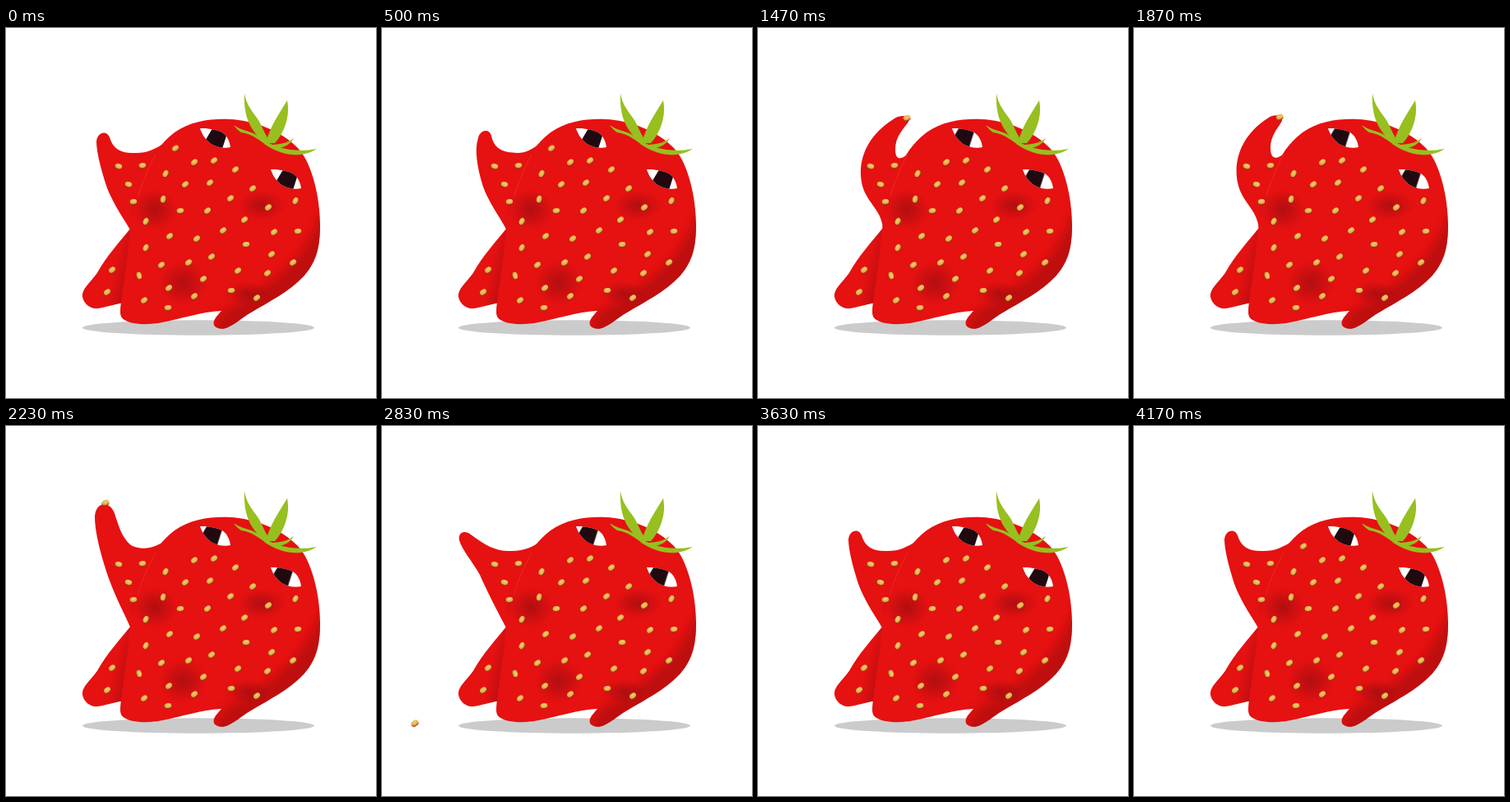
An HTML page that plays this animation: 450 px wide and 450 px high, repeating every 4210 ms.

```html
<!DOCTYPE html>
<html lang="en">
<head>
<meta charset="utf-8">
<title>Strawberry</title>
<style>
html, body { margin: 0; width: 100%; height: 100%; overflow: hidden; background: #fff; }
svg { display: block; width: 100%; height: 100%; }

#arm {
  --rest: path("M152 247C146 236 130 214 122 192C115 170 110 150 110 138C111 126 123 124 126 133C130 147 140 153 158 152C172 152 180 148 196 138L190 200Z");
  --raised: path("M152 247C152 222 133 214 127 192C120 165 130 132 166 110C176 104 186 108 183 114C176 124 167 132 167 148C167 164 178 162 196 138L190 200Z");
  --pick: path("M152 247C154 222 133 214 127 192C118 160 130 112 188 128C200 131 212 138 208 146C200 150 174 144 169 156C168 163 178 162 196 138L190 200Z");
  --aim: path("M152 247C146 232 134 210 126 188C116 160 108 130 108 110C109 92 126 90 132 106C137 122 141 136 152 145C166 152 180 149 196 138L190 200Z");
  --thrown: path("M152 247C144 232 130 206 119 181C110 165 97 150 94 139C92 129 101 126 108 132C125 145 138 152 154 152C172 153 184 147 196 138L190 200Z");
  d: var(--rest);
  animation: arm 4.21s linear infinite;
}
@keyframes arm {
  0%, 9.5% { d: var(--rest); animation-timing-function: ease-in; }
  17.8% { d: var(--raised); animation-timing-function: ease-out; }
  23%, 25.2% { d: var(--pick); animation-timing-function: ease-in-out; }
  33.7%, 42.8% { d: var(--raised); animation-timing-function: ease-in-out; }
  52%, 53% { d: var(--aim); }
  60.8%, 68.9% { d: var(--thrown); animation-timing-function: ease-in-out; }
  80.8%, 100% { d: var(--rest); }
}

#loose { animation: loose 4.21s linear infinite; }
@keyframes loose {
  0%, 25.2% { transform: translate(206px, 146px) rotate(-35deg); animation-timing-function: ease-in-out; }
  33.7%, 42.8% { transform: translate(181px, 109px) rotate(-20deg); animation-timing-function: ease-in-out; }
  52%, 53% { transform: translate(121px, 93px) rotate(-20deg); }
  57% { transform: translate(108px, 112px) rotate(-60deg); }
  59.3% { transform: translate(89px, 157px) rotate(-140deg); }
  61.6% { transform: translate(69px, 241px) rotate(-220deg); }
  63.9% { transform: translate(50px, 361px) rotate(-300deg); }
  67.2% { transform: translate(40px, 361px) rotate(-395deg); animation-timing-function: ease-out; }
  76% { transform: translate(27px, 361px) rotate(-470deg); opacity: 1; }
  77% { transform: translate(27px, 361px) rotate(-470deg); opacity: 0; animation-timing-function: step-end; }
  89% { transform: translate(206px, 146px) rotate(-35deg) scale(0); opacity: 1; animation-timing-function: ease-out; }
  94%, 100% { transform: translate(206px, 146px) rotate(-35deg) scale(1); opacity: 1; }
}

.pupil { fill: #200a10; animation: look 4.21s ease-in-out infinite; }
@keyframes look {
  0%, 26% { transform: none; }
  32%, 77% { transform: translate(-6.5px, -1px); }
  83%, 100% { transform: none; }
}
</style>
</head>
<body>
<svg viewBox="0 0 450 450">
  <defs>
    <radialGradient id="smudge">
      <stop offset="0" stop-color="#8c0c10" stop-opacity=".58"/>
      <stop offset=".5" stop-color="#960c10" stop-opacity=".34"/>
      <stop offset="1" stop-color="#a00c10" stop-opacity="0"/>
    </radialGradient>
    <radialGradient id="armFill" gradientUnits="userSpaceOnUse" cx="178" cy="220" r="28">
      <stop offset="0" stop-color="#a60d10"/>
      <stop offset="1" stop-color="#e61111"/>
    </radialGradient>
    <linearGradient id="legFill" gradientUnits="userSpaceOnUse" x1="132" y1="290" x2="151" y2="294">
      <stop offset="0" stop-color="#e61111"/>
      <stop offset="1" stop-color="#bd0e10"/>
    </linearGradient>
    <filter id="soft" x="-20%" y="-20%" width="140%" height="140%"><feGaussianBlur stdDeviation="5"/></filter>
    <path id="body" d="M139 345C140 325 147 290 149 260C151 235 162 200 172 172C178 155 188 140 205 127C225 113 250 110 272 111C300 112 335 125 355 146C372 164 382 205 382 240C382 270 376 286 362 302C345 320 320 333 298 346C286 353 279 360 270 364C262 368 250 365 253 356C255 351 259 348 262 344C238 345 212 354 190 358C175 361 158 361 148 357C141 354 139 351 139 345Z"/>
    <path id="eye" d="M236 122C247 121.500 256 124 263 127C269 131 272 138 273 145C262 147 253 144 247 139C241 134 238 128 236 122Z"/>
    <clipPath id="inBody"><use href="#body"/></clipPath>
    <clipPath id="inEye"><use href="#eye"/></clipPath>
  </defs>

  <ellipse cx="234" cy="364.500" rx="141" ry="9.300" fill="#cbcbcb"/>
  <path fill="url(#legFill)" d="M152 243C138 260 122 278 112 296C105 308 92 316 93 327C95 337 104 342 112 341C124 339 134 335 146 334L160 280Z"/>
  <path id="arm" fill="url(#armFill)"/>

  <use href="#body" fill="#e61111"/>
  <g clip-path="url(#inBody)">
    <path d="M390 205C374 262 350 292 292 330L264 345L250 375L395 375Z" fill="#9c0c10" opacity=".52" filter="url(#soft)"/>
    <g fill="url(#smudge)">
      <ellipse cx="181" cy="221" rx="27" ry="25"/>
      <ellipse cx="311" cy="216" rx="29" ry="18"/>
      <ellipse cx="215" cy="310" rx="29" ry="27"/>
      <ellipse cx="294" cy="323" rx="28" ry="15"/>
    </g>
  </g>
  <path d="M160 206C164 193 171 174 182 154" fill="none" stroke="#f0473f" stroke-width=".8" opacity=".6"/>

  <g id="seeds"></g>

  <g>
    <use href="#eye" fill="#fff"/>
    <g clip-path="url(#inEye)"><path class="pupil" d="M253 119L271 122L262 150L238 144Z"/></g>
  </g>
  <g transform="translate(86 50)">
    <use href="#eye" fill="#fff"/>
    <g clip-path="url(#inEye)"><path class="pupil" d="M253 119L271 122L262 150L238 144Z"/></g>
  </g>

  <g fill="#97bf1f">
    <path d="M290 79C292 94 301 103 307 112C312 120 314 128 319 135L314 139C304 130 288 116 290 79Z"/>
    <path d="M342 88C346 108 338 128 327 140L316 140C322 118 330 108 342 88Z"/>
    <path d="M277 118C286 125 298 125 308 132L320 136L318 143C308 137 300 129 286 127C283 125 279 122 277 118Z"/>
    <path d="M350 134C346 141 340 145 331 146L320 142C333 142 342 140 350 134Z"/>
    <path d="M316 138C332 146 350 152 378 147C360 158 338 157 314 141Z"/>
  </g>

  <g id="loose"></g>
</svg>
<script>
const NS = "http://www.w3.org/2000/svg";

function ellipse(parent, attrs) {
  const el = document.createElementNS(NS, "ellipse");
  for (const key in attrs) el.setAttribute(key, attrs[key]);
  parent.append(el);
}

function drawSeed(parent) {
  ellipse(parent, { cx: -0.4, cy: 0.9, rx: 4.6, ry: 3.2, fill: "#9a3a16" });
  ellipse(parent, { rx: 4.3, ry: 3, fill: "#e3b14c" });
  ellipse(parent, { cx: 0.5, cy: -0.6, rx: 2.8, ry: 1.5, fill: "#edc768" });
}

// Seed positions grouped by tilt in degrees.
const seeds = {
  "-35": "229,163 253,161 218,190 248,188 279,172 300,195 245,222 273,207 319,218 264,246 290,233 326,248 199,253 232,256 323,275 189,288 222,285 250,278 282,295 318,298 349,285 198,316 240,305 305,328 168,331 229,326 129,294 123,321",
  "-10": "212,222 355,247 292,263 274,319 197,340 166,167 155,211",
  "-60": "194,177 170,235 170,267 352,210",
  "-75": "191,208",
  "75": "162,301",
  "12": "137,168 149,190"
};

const field = document.getElementById("seeds");
for (const [tilt, list] of Object.entries(seeds)) {
  for (const place of list.split(" ")) {
    const g = document.createElementNS(NS, "g");
    g.setAttribute("transform", `translate(${place}) rotate(${tilt})`);
    drawSeed(g);
    field.append(g);
  }
}
drawSeed(document.getElementById("loose"));
</script>
</body>
</html>
```
